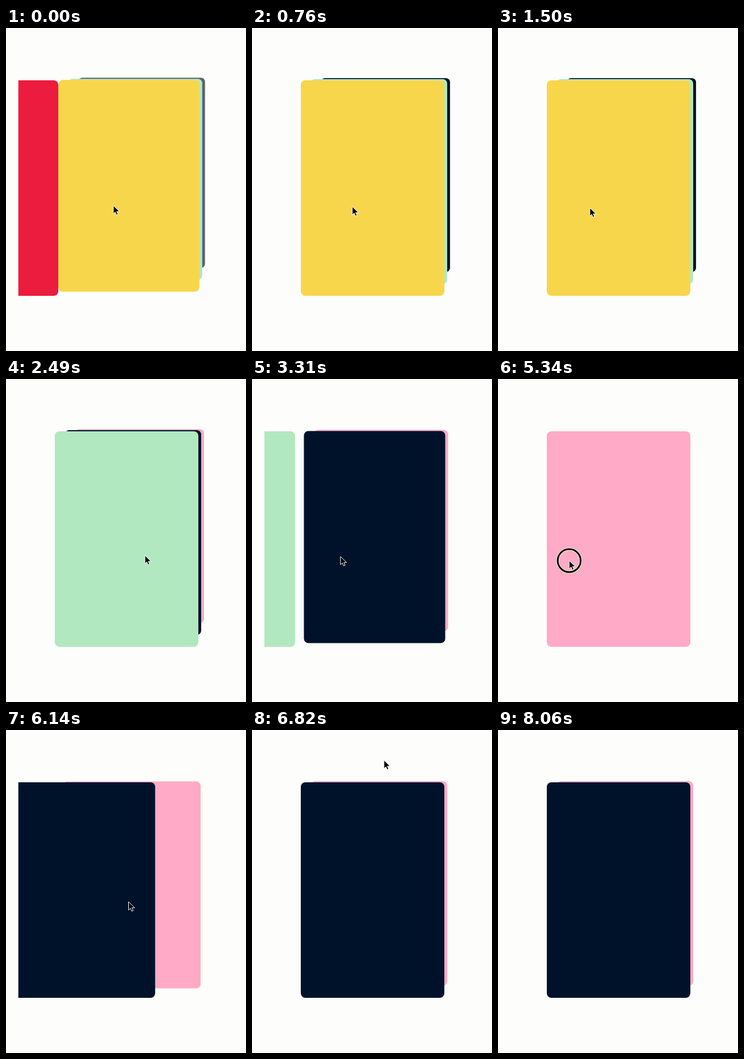
An HTML page that plays this animation: 418 px wide and 562 px high, repeating every 8520 ms.

```html
<!DOCTYPE html>
<html lang="en">
<head>
<meta charset="utf-8">
<title>Card deck</title>
<style>
  html, body { margin: 0; width: 100%; height: 100%; overflow: hidden; background: #fdfdfc; }
  svg { display: block; width: 418px; height: 562px; }
</style>
</head>
<body>
<svg viewBox="0 0 418 562">
  <defs>
    <clipPath id="page"><rect x="21.5" width="375" height="562"/></clipPath>
  </defs>
  <g id="deck" clip-path="url(#page)"></g>
  <g id="pointer">
    <g id="ring" fill="none">
      <circle r="20" stroke="#fff6e0" stroke-width="5"/>
      <circle r="20" stroke="#000" stroke-width="3"/>
    </g>
    <path d="M0 0V14.3L3.3 11.3L5.5 16.3L8 15.2L5.8 10.3H10.6Z" fill="#000" stroke="#fff"/>
  </g>
</svg>
<script>
  const LOOP = 8520, PAGE = 376, W = 250, H = 375, CX = 210, CY = 278.5;
  const COLORS = ['#ec1c3e', '#f8d64c', '#b2e8c0', '#00122a', '#ffaac6'];

  // The loop opens in the middle of the first swipe.
  const SWIPES = [
    { start: -775, time: 1300, step: 1 },
    { start: 1680, time: 800, step: 1 },
    { start: 2810, time: 800, step: 1 },
    { start: 4380, time: 700, step: 1 },
    { start: 5400, time: 1050, step: -1 }
  ];
  const PRESS_LEAD = 60, PRESS_TIME = 350;

  // Where the pointer pauses; pull bends the way there to the left.
  const STOPS = [
    { t: 0, x: 187, y: 309 },
    { t: 1500, x: 160, y: 313, pull: 0 },
    { t: 2490, x: 242, y: 307, pull: 70 },
    { t: 4320, x: 161, y: 312, pull: 60 },
    { t: 5240, x: 124, y: 316, pull: 40 },
    { t: 6140, x: 213.5, y: 299, pull: 0 },
    { t: 7100, x: 235, y: -25, pull: 0 }
  ];
  const PAUSE = 100;

  const $ = id => document.getElementById(id);
  const clamp = (v, a, b) => Math.min(b, Math.max(a, v));
  const ease = u => (1 - Math.cos(Math.PI * clamp(u, 0, 1))) / 2;

  const cards = COLORS.map(fill => {
    const el = document.createElementNS('http://www.w3.org/2000/svg', 'rect');
    const attrs = { x: -W / 2, y: -H / 2, width: W, height: H, rx: 8, fill };
    for (const k in attrs) el.setAttribute(k, attrs[k]);
    $('deck').prepend(el);
    return el;
  });

  const deckPos = t => SWIPES.reduce((p, s) => p + s.step * ease((t - s.start) / s.time), 0);

  const pressed = t => SWIPES.some(({ start }) =>
    t >= start - PRESS_LEAD && t < start - PRESS_LEAD + PRESS_TIME);

  function pointerAt(t) {
    const next = STOPS.findIndex(s => s.t > t);
    if (next < 0) return STOPS.at(-1);
    const a = STOPS[next - 1], b = STOPS[next];
    const u = clamp((t - a.t - PAUSE) / (b.t - a.t - PAUSE), 0, 1);
    const k = ease(u);
    return {
      x: a.x + (b.x - a.x) * k - b.pull * Math.sin(Math.PI * u),
      y: a.y + (b.y - a.y) * k
    };
  }

  // Depth 0 is the front card, negative depths slide off the page.
  function place(el, depth) {
    const back = Math.max(depth, 0);
    const x = CX + depth * (depth < 0 ? PAGE : 11.2);
    const y = CY - back * 11.3;
    el.setAttribute('transform', `translate(${x} ${y}) scale(${1 - 0.05 * back})`);
    el.setAttribute('opacity', clamp(3 - depth, 0, 1));
  }

  function draw(time) {
    const t = time % LOOP;
    const pos = deckPos(t);
    cards.forEach((el, i) => place(el, i - pos));
    const { x, y } = pointerAt(t);
    $('pointer').setAttribute('transform', `translate(${x} ${y})`);
    $('ring').setAttribute('visibility', pressed(t) ? 'visible' : 'hidden');
  }

  let start;
  function tick(now) {
    start ??= now;
    draw(now - start);
    requestAnimationFrame(tick);
  }
  draw(0);
  requestAnimationFrame(tick);
</script>
</body>
</html>
```
